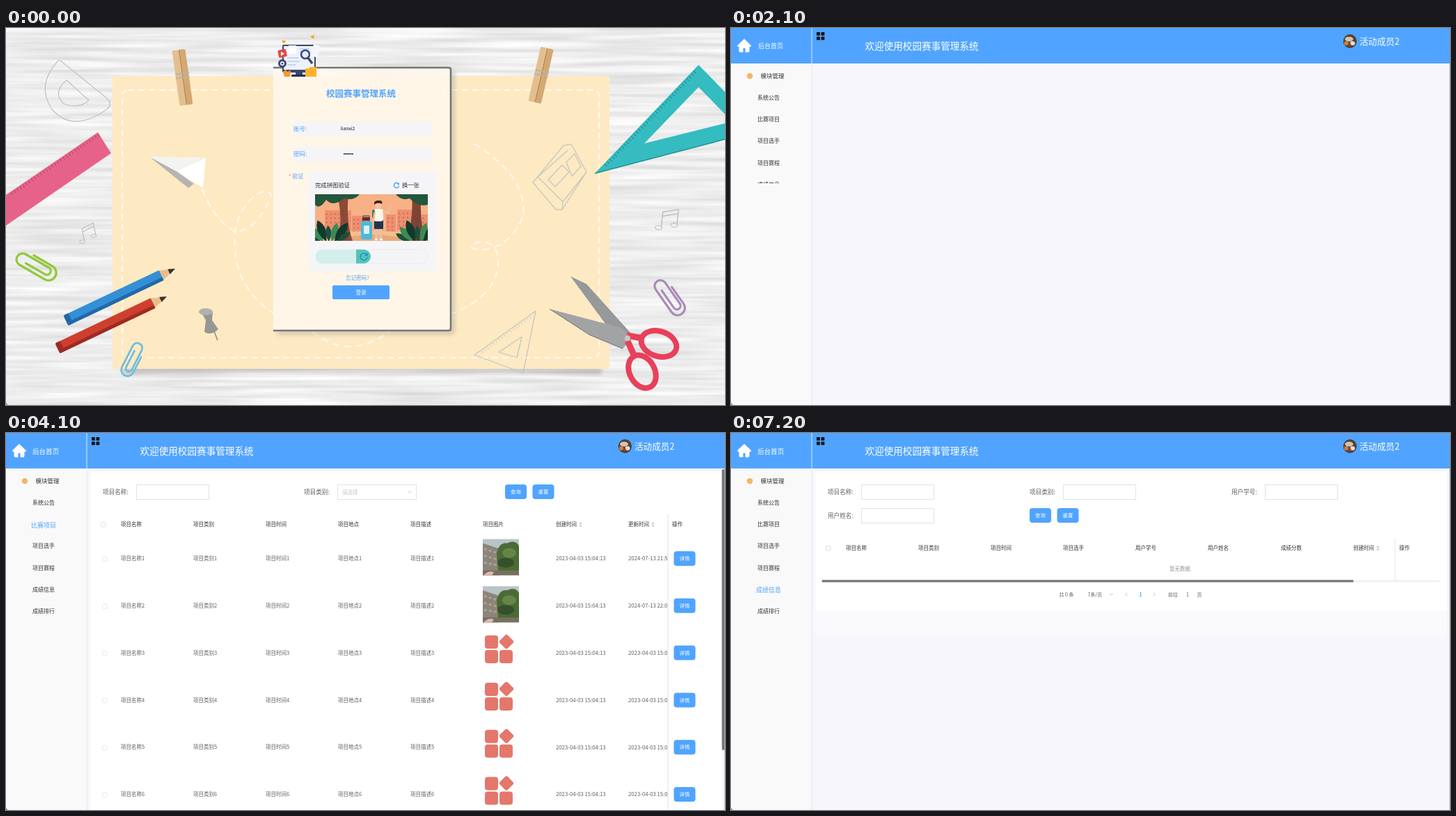
An HTML page that plays this animation: 1033 by 542 pixels, repeating every 8 s.

```html
<!DOCTYPE html>
<html lang="zh-CN">
<head>
<meta charset="utf-8">
<style>
  html, body { margin: 0; width: 100%; height: 100%; overflow: hidden; background: #f6f6fb; }
  svg { display: block; font-family: "Noto Sans CJK SC", "Noto Sans CJK", sans-serif; white-space: pre; }
</style>
</head>
<body>
<svg id="stage" width="1033" height="542" viewBox="0 0 1033 542"></svg>
<script>
const BLUE = '#50a4ff', DARK = '#303133', BODY = '#5c5e63';
const LOOP = 8000;

const rect = (x, y, w, h, fill, r = 0, more = '') =>
  `<rect x="${x}" y="${y}" width="${w}" height="${h}" fill="${fill}" rx="${r}" ${more}/>`;
const box = (x, y, w, h, stroke = '#dfe2e8', r = 0) =>
  rect(x + .5, y + .5, w - 1, h - 1, '#fff', r, `stroke="${stroke}"`);
const fill = (d, color, more = '') => `<path d="${d}" fill="${color}" ${more}/>`;
const line = (d, color, w = 1, more = '') =>
  `<path d="${d}" fill="none" stroke="${color}" stroke-width="${w}" ${more}/>`;
const oval = (x, y, rx, ry, color, more = '') =>
  `<ellipse cx="${x}" cy="${y}" rx="${rx}" ry="${ry}" fill="${color}" ${more}/>`;
const text = (x, y, s, size = 7.53, color = BODY, more = '') =>
  `<text x="${x}" y="${(y + size * .37).toFixed(2)}" font-size="${size}" fill="${color}" ${more}>${s}</text>`;
const group = (transform, s) => `<g transform="${transform}">${s}</g>`;
const MID = 'text-anchor="middle" ';
const BOLD = 'font-weight="500"';

// ---------- login screen ----------
const clip = (x, y, angle, scale, color) => group(`translate(${x} ${y}) rotate(${angle}) scale(${scale})`,
  line('M-4-14V15a5 5 0 0 0 10 0V-20a8 8 0 0 0-16 0V18a10 10 0 0 0 20 0V-10', color, 3, 'stroke-linecap="round"'));

const pencil = (x, y, light, dark) => group(`translate(${x} ${y}) rotate(154.6)`,
  fill('M0 0L24-8V8Z', '#e9bd8c') + fill('M0 0L10-4V4Z', '#3a3030') +
  rect(22, -8, 151, 16, light, 1) + rect(22, -8, 151, 5, dark) + rect(166, -8, 8, 16, dark, 2));

const peg = (x, y, angle) => group(`translate(${x} ${y}) rotate(${angle})`,
  rect(-10, -40, 10, 80, '#e3bf90', 2) + rect(0, -40, 9, 80, '#d3a873', 2) +
  line('M0-40V40', '#a97f50') + line('M-10-6H10M-10 0H10', '#b9b3a8', 2));

const refresh = (x, y, r, color) =>
  line(`M${x + r * .9} ${y - r * .4}A${r} ${r} 0 1 0 ${x + r} ${y + r * .2}`, color, 1.1) +
  fill(`M${x + r * 1.1} ${y - r}v${r * .8}h${-r * .8}Z`, color);

const leaf = (x, y, len, angle, color) => group(`translate(${x} ${y}) rotate(${angle})`,
  fill(`M0 0Q${len * .35} ${-len * .6} 0 ${-len}Q${-len * .35} ${-len * .6} 0 0`, color));

function captcha() {
  let s = '<clipPath id="picture"><path d="M444 239h162v67h-162Z"/></clipPath>' + rect(444, 239, 162, 67, '#f7b184');
  for (const [x, y, w] of [[458, 262, 38], [497, 270, 24], [546, 268, 14], [562, 261, 30], [590, 268, 16]]) {
    s += rect(x, y, w, 30, '#ee9070');
    for (let i = 3; i < w - 3; i += 6) s += line(`M${x + i} ${y + 4}v20`, '#d9785f', 2.5, 'stroke-dasharray="3 3"');
  }
  s += oval(525, 303, 85, 11, '#f3c08e') + fill('M470 306Q525 288 585 306Z', '#e8a878');
  s += fill('M474 306Q486 285 476 239H492Q488 280 498 306Z', '#8b4a35') +
       fill('M575 306Q586 275 583 239H597Q593 280 604 306Z', '#7d4434');
  s += fill('M444 239H508Q500 249 486 245Q470 258 460 247Q450 262 444 254Z', '#23563c') +
       fill('M606 239H560Q568 249 580 245Q592 258 606 254Z', '#23563c');
  for (let i = 0; i < 7; i++) {
    const color = ['#1d4f3a', '#3f8a54', '#12392d'][i % 3];
    s += leaf(452 + i * 4, 307, 23 + i % 3 * 5, -60 + i * 19, color) +
         leaf(580 + i * 4, 307, 23 + i % 3 * 5, -60 + i * 19, color);
  }
  // traveller and suitcase
  s += line('M513 280V270H522V280', '#345', 1) + rect(510, 278, 16, 26, '#4db8dc', 3) +
       rect(514, 284, 8, 12, '#d9f1f5', 1) + rect(512, 272, 11, 5, '#5a3030', 2);
  s += line('M532 278V304M538 278V304', '#efbf9d', 4) + line('M530 304h4M537 304h4', '#fff', 2.5) +
       rect(529, 276, 13, 13, '#25344d', 1) + rect(528, 260, 14, 18, '#fff7e8', 4) +
       rect(526, 261, 4, 13, '#3c8a62', 2) + line('M541 264L549 266L553 254', '#efbf9d', 2.5) +
       line('M530 265L527 278', '#efbf9d', 2.5) + oval(535, 254, 5, 5.5, '#f3c6a2') +
       fill('M529 254Q528 247 536 248Q542 248 540 253Q534 250 529 254', '#3a2626');
  return `<g clip-path="url(#picture)">${s}</g>`;
}

function emblem() {
  return rect(397, 24, 48, 40, '#3d4870', 2) + rect(399, 26, 44, 34, '#edf1fb') +
    rect(406, 25, 11, 12, '#fff') + line('M422 30h14M422 34h9M404 43h16M404 48h18M404 53h12', '#c9d5ee', 2) +
    rect(391, 31, 12, 11, '#e04a43', 2, 'transform="rotate(-12 397 36)"') + fill('M395 34l5 3-5 3Z', '#fff') +
    oval(397, 51, 4.5, 4.5, '#fff', 'stroke="#3d4870" stroke-width="3"') + oval(397, 51, 1.5, 1.5, '#3d4870') +
    oval(430, 38, 6, 6, '#dcebff', 'stroke="#3d4870" stroke-width="2.5"') + line('M434 43l6 8', '#3d4870', 3.5) +
    rect(439, 24, 11, 17, '#f4f6fb', 1, 'transform="rotate(20 444 33)"') +
    rect(416, 62, 10, 7, '#3d4870') + rect(410, 67, 22, 3, '#27304f', 1) +
    fill('M430 58h5l2-2h9v14h-16Z', '#fdb32b') + fill('M398 63l4-3 2 3 5-2-1 9h-8Z', '#f59b2a') +
    fill('M437 12l6-2-1 6ZM396 18h6l-3 5Z', '#f7a823');
}

function login() {
  const sketch = d => line(d, '#c6c6bd', 1.3, 'stroke-linejoin="round"');
  const dash = d => line(d, '#fffaf0', 2, 'stroke-dasharray="10 7"');
  let s = `<filter id="wood" x="0" y="0" width="1" height="1" color-interpolation-filters="sRGB">
    <feTurbulence type="fractalNoise" baseFrequency=".006 .14" numOctaves="2" seed="4"/>
    <feColorMatrix values=".2 0 0 0 .83 .2 0 0 0 .83 .2 0 0 0 .83 0 0 0 0 1"/></filter>
    <filter id="soft"><feGaussianBlur stdDeviation="3"/></filter>`;
  s += rect(0, 0, 1033, 542, '#eee', 0, 'filter="url(#wood)"');
  s += fill('M162 480H860L854 499Q510 487 170 499Z', '#8886', 'filter="url(#soft)"') + rect(153, 69, 714, 421, '#fdeac3');
  s += rect(167, 89, 685, 385, 'none', 8, 'stroke="#fffaf0" stroke-width="2" stroke-dasharray="9 6"');

  s += dash('M282 232Q300 278 330 293Q362 290 381 240Q374 226 351 247Q325 275 329 318Q332 375 384 410') +
       dash('M440 436Q490 480 552 436') +
       dash('M672 166Q750 214 743 270Q725 316 682 319Q656 316 678 308Q708 304 707 340Q704 385 640 411');
  s += peg(254, 71, -8) + peg(769, 68, 13);
  s += sketch('M74 48Q43 82 66 117Q97 152 146 116Q153 109 145 101L82 50Q77 45 74 48ZM87 75Q66 93 83 109Q106 117 119 104ZM87 75L119 104');
  s += fill('M0 240L132 150L151 180L0 284Z', '#e76289') +
       line('M8 238L134 153', '#b84868', 5, 'stroke-dasharray="1 4"');
  s += fill('M995 53L846 209L1033 160V137L917 166L995 85L1033 124V92Z', '#35bcc0') +
       line('M990 63L860 199', '#20898f', 5, 'stroke-dasharray="1 4"') + line('M846 209L1033 160', '#218f94', 1.5);
  s += fill('M206 185L287 187L283 230L245 206Z', '#fff') + fill('M206 185L245 206L270 224L262 230Z', '#b4b4b2') +
       fill('M206 185L287 187L245 206Z', '#f3f3f1');
  s += sketch('M757 222L801 169L812 167L834 207L799 261L790 261ZM757 222L764 214L800 250L799 261M764 214L807 176M800 250L834 207M779 218L799 197L809 207L789 228ZM805 193L817 181L826 199L813 213Z');
  s += sketch('M673 470L761 407L743 496ZM708 466L741 444L734 474Z') +
       line('M684 466L754 416', '#c6c6bd', 3, 'stroke-dasharray="1 4"');
  const note = line('M6 24V2L28-4V18M6 8L28 2', '#b9b9b9', 1.3) +
    oval(2, 25, 5, 3, 'none', 'stroke="#b9b9b9"') + oval(24, 19, 5, 3, 'none', 'stroke="#b9b9b9"');
  s += group('translate(938 262) rotate(6)', note) + group('translate(104 288) rotate(-12) scale(.8)', note);

  s += clip(44, 342, -60, 1.1, '#93c83d') + clip(954, 387, -35, 1.05, '#a98bb8') + clip(182, 477, 27, .9, '#70bcdc');
  s += pencil(243, 346, '#3390d6', '#2467a8') + pencil(231, 386, '#cf3f2d', '#9c2b25');
  s += line('M299 436L304 449', '#888', 1.5) + fill('M280 408Q287 402 297 408L296 420L305 433Q295 443 285 437L287 420Z', '#969794') +
       oval(287, 408, 10, 5, '#b0b1ae');
  s += fill('M811 357L834 368L897 438L886 453L872 440Z', '#96989a') + fill('M781 404L884 431L900 446L886 461L838 441Z', '#a2a3a4') +
       line('M781 404L838 441L886 461', '#707275', 1) + line('M892 442L914 446M893 450L903 472', '#e8405b', 9) +
       oval(938, 454, 26, 18, 'none', 'stroke="#e8405b" stroke-width="8" transform="rotate(18 938 454)"') +
       oval(914, 494, 18, 25, 'none', 'stroke="#e8405b" stroke-width="8" transform="rotate(-28 914 494)"') +
       oval(893, 446, 4, 4, '#c9c9c9');

  // card
  s += line('M390 438H639Q642 438 642 434V62', '#8888', 4, 'filter="url(#soft)"');
  s += fill('M384 57H636Q639 57 639 60V432Q639 435 636 435H384Z', '#fff8ef', 'opacity=".85"') +
       line('M384 57H636Q639 57 639 60V432Q639 435 636 435H384', '#747774', 2.6);
  s += emblem() + text(510, 94, '校园赛事管理系统', 12.5, BLUE, MID + 'font-weight="700"');
  s += rect(412, 134, 201, 21, '#f5f5f7', 2) + text(413, 145, '账号:', 8.5, BLUE) + text(491, 145, 'lianxi2', 6.7, '#111', MID);
  s += rect(412, 171, 201, 21, '#f5f5f7', 2) + text(413, 181, '密码:', 8.5, BLUE);
  for (let i = 0; i < 6; i++) s += oval(486 + i * 2.4, 181, .95, .95, '#111');
  s += text(406, 213, '*', 7.5, '#f56c6c') + text(411, 213, '验证', 8.2, BLUE);
  s += rect(434, 206, 184, 143, '#f5f5f7') + text(444, 226, '完成拼图验证', 8.4, DARK) +
       refresh(561, 226, 3.6, '#2d8cf0') + text(569, 226, '换一张', 8.3, DARK) + captcha();
  s += rect(444.5, 318.5, 161, 20, '#f5f5f7', 10, 'stroke="#ececf0"') +
       fill('M504 318.5H454.5a10 10 0 0 0 0 20H504Z', '#d4efeb') +
       fill('M503 318.5H514a10 10 0 0 1 0 20H503Z', '#51c5b7') + refresh(514, 328.5, 5, '#2277e0');
  s += text(505, 359, '忘记密码?', 7.5, BLUE, MID) + rect(469, 370, 82, 20, BLUE, 2) +
       text(510, 380, '登录', 7.6, '#fff', MID + BOLD);
  return s;
}

// ---------- admin screens ----------
const MENU = ['系统公告', '比赛项目', '项目选手', '项目赛程', '成绩信息', '成绩排行'];
const EVEN = [165, 269, 373, 477, 581, 685, 790, 894];
const WIDE = [165, 280, 393, 505, 618, 730, 843];
const SEARCH4 = ['项目名称', '项目类别', '用户学号', '用户姓名'];
const PAGES = [
  { at: 2700, loaded: 2800, fields: ['公告标题', '公告标签'], buttons: 719, xs: WIDE, actionX: 955,
    cols: ['公告标题', '公告标签', '公告日期', '公告描述', '公告内容', '创建时间', '更新时间'] },
  { at: 3600, loaded: 3700, fields: ['项目名称', '项目类别'], buttons: 717, xs: EVEN, actionX: 957, tall: true,
    cols: ['项目名称', '项目类别', '项目时间', '项目地点', '项目描述', '项目图片', '创建时间', '更新时间'] },
  { at: 5000, fields: SEARCH4, xs: EVEN, actionX: 960, emptyX: 801, bar: 586,
    cols: ['项目名称', '项目类别', '项目时间', '项目地点', '项目选手', '用户学号', '用户姓名', '项目组别'] },
  { at: 5900, loaded: 6000, fields: ['项目名称', '项目类别'], buttons: 719, xs: WIDE, actionX: 955,
    cols: ['项目名称', '项目类别', '项目地点', '比赛时间', '注意事项', '创建时间', '更新时间'] },
  { at: 7000, fields: SEARCH4, xs: EVEN, actionX: 960, emptyX: 645, bar: 764, below: '#fafafc',
    cols: ['项目名称', '项目类别', '项目时间', '项目选手', '用户学号', '用户姓名', '成绩分数', '创建时间'] },
];

const button = (x, y, label) => rect(x, y, 31, 21, BLUE, 4) + text(x + 15.5, y + 10.5, label, 7.4, '#fff', MID + BOLD);
const chevron = (x, y, turn) => group(`translate(${x} ${y}) rotate(${turn})`, line('M-2.5-1.2L0 1.2L2.5-1.2', '#b4b8c0', .8));
const mix = (a, b, p) => `rgb(${a.map((v, i) => Math.round(v + (b[i] - v) * p))})`;
const menuColor = p => mix([48, 49, 51], [80, 164, 255], p);
const stepped = (t, start, levels) => levels[Math.min(2, Math.floor((t - start) / 100))];

function frame(t, active) {
  let s = rect(0, 0, 1033, 542, '#f6f6fb') + rect(0, 51, 116, 491, '#f9f9f9') + rect(115.5, 51, 1, 491, '#e6e7ec') +
    rect(0, 0, 1033, 51, BLUE) + rect(115.5, 0, 1, 51, '#d8eaff');
  s += fill('M19 16L9.5 25.2Q9 26.5 10.5 26.5H12V33Q12 34.5 13.5 34.5H17V28.5H21V34.5H24.5Q26 34.5 26 33V26.5H27.5Q29 26.5 28.5 25.2Z',
    '#fff', 'stroke="#fff" stroke-linejoin="round"');
  s += t < 2700 ? text(39, 26, '后台首页', 9, '#fff') : text(38, 26, '后台首页', 9.55, '#fff');
  for (const x of [123, 129.5]) for (const y of [6, 12.5]) s += rect(x, y, 4.8, 4.8, '#111');
  s += text(192.5, 26, '欢迎使用校园赛事管理系统', 13.6, '#fff') + text(903, 19, '活动成员2', 12.6, '#fff');
  s += oval(889.3, 19, 9.7, 9.9, t < 1100 ? '#c0c4cc' : '#50423a');
  if (t >= 1100) s += oval(888, 16, 6, 3.5, '#d8c3a5') + oval(884, 22, 3, 3, '#c98443') +
    oval(893, 22, 3.5, 3, '#e8ded0') + oval(889, 24, 2, 2, '#a23f2c');
  s += oval(27, 69, 3.6, 3.6, '#f0ad55', 'stroke="#f0b568" stroke-width="1.8" stroke-dasharray="1.6 1.2"') +
       line('M25.3 69l1.3 1.3 2.3-2.5', '#fbe3bd', .9) + text(42.5, 69, '模块管理', 8.5, DARK);
  if (t >= 2000) {
    const p = active < 0 ? 0 : stepped(t, PAGES[active].at, [.25, .7, 1]);
    MENU.forEach((label, i) => {
      const on = i === active, wasOn = i === PAGES.length - 1 ? false : i === active - 1;
      const color = menuColor(on ? p : wasOn ? 1 - p : 0);
      s += text(54, 100 + i * 31.2 + on, label, on ? 9 : 8, color, MID);
    });
    const shown = 84 + 186 * stepped(t, 2000, [.3, .75, 1]);
    s += rect(20, shown, 90, 280 - shown, '#f9f9f9');
  }
  return s;
}

function pager(y, total, d) {
  let s = text(462 + d, y, `共 ${total} 条`, 7) + text(503 + d, y, '7条/页', 7) + chevron(537 + d, y, 0) +
    chevron(558.5 + d, y, 90) + text(579 + d, y, '1', 7, BLUE, MID + 'font-weight="700"');
  if (total > 7) s += text(597.5, y, '2', 7, DARK, MID + 'font-weight="700"');
  return s + chevron(617.5 - d, y, -90) + text(637.5 - d, y, '前往', 7) + text(665.5 - d, y, '1', 7, BODY, MID) + text(679 - d, y, '页', 7);
}

function searchBar(page) {
  let s = '';
  page.fields.forEach((label, i) => {
    const select = Boolean(page.tall && i === 1);
    const x = 139 + i % 3 * 290 - select, y = i > 2 ? 108 : 74;
    s += text(x, y + 10.5, label + ':', 8.6, BODY) + box(x + 48, y, select ? 114 : 105, 22);
    if (select) s += text(x + 55, y + 11, '请选择', 7.5, '#c0c4cc') + chevron(580, y + 11, 0);
  });
  const [x, y] = page.buttons ? [page.buttons, 74] : [429, 108];
  return s + button(x, y, '查询') + button(x + 39.5, y, '重置');
}

function photo(x, y) {
  return rect(x, y, 52, 52, '#b9c4c7') + fill(`M${x} ${y + 6}l24 8v38h-24Z`, '#8b8478') +
    line(`M${x + 2} ${y + 14}l22 7M${x + 2} ${y + 24}l22 6M${x + 2} ${y + 34}l22 4`, '#aaa192', 3, 'stroke-dasharray="4 3"') +
    fill(`M${x + 20} ${y + 20}q4-16 15-14q12-6 17 4v36h-30Z`, '#4c6a35') +
    oval(x + 38, y + 20, 10, 7, '#668548') + oval(x + 33, y + 34, 12, 7, '#35512b') +
    rect(x, y + 45, 52, 7, '#77705f') + fill(`M${x + 1} ${y + 52}q8-8 15-4l-3 4Z`, '#e5b6ae');
}

const tiles = (x, y) => rect(x + 3, y + 4, 19, 19, '#e4776b', 4) + rect(x + 3, y + 25, 19, 19, '#e4776b', 4) +
  rect(x + 24, y + 25, 19, 19, '#e4776b', 4) + rect(x + 26, y + 5, 16, 16, '#e4776b', 3, `transform="rotate(45 ${x + 34} ${y + 13})"`);

function cell(page, title, x, y, row, t) {
  if (title === '项目图片') {
    if (row < 3) return photo(x, y - 28);
    return t >= 4100 ? tiles(x, y - 29) : '';
  }
  if (/创建时间|更新时间/.test(title)) {
    const edited = page.tall && title === '更新时间' && row < 3;
    return text(x, y, edited ? ['2024-07-13 21:53:27', '2024-07-13 22:02:15'][row - 1] : '2023-04-03 15:04:13', 7.75);
  }
  if (/公告描述|公告内容|注意事项/.test(title))
    return text(x, y - 6, '此处可上传文字、图片、视频、') + text(x, y + 6, '超链接、表格等内容区' + row);
  return title === '公告日期' ? text(x, y, '2023-04-03', 7.75) : text(x, y, title + row);
}

function table(page, t) {
  const headY = page.fields.length > 3 ? 165.5 : 131.5;
  const full = t >= page.loaded;
  let s = box(136, headY - 3.5, 7.5, 7.5, full ? '#dcdfe6' : '#d5dbe4', 1);
  page.cols.forEach((title, i) => {
    const x = page.xs[i];
    s += text(x, headY, title, 7.53, DARK, BOLD);
    if (/创建时间|更新时间/.test(title)) s += fill(`M${x + 33} ${headY - .7}l2.5-2.6 2.5 2.6ZM${x + 33} ${headY + 1}l2.5 2.6 2.5-2.6Z`, '#bfc3cb');
  });
  const action = text(page.actionX, headY, '操作', 7.53, DARK, BOLD);
  if (!full) {
    s += text(page.emptyX || 575, headY + 30, '暂无数据', 7.5, '#909399', MID);
    if (page.bar) s += rect(131, 211.5, 888, 3, '#f2f2f4', 1.5) + rect(130.5, 211.3, page.bar, 3.2, '#777478', 1.5) + rect(953.5, 152, 1, 62, '#e6e6ea');
    return s + action + pager(headY + (page.bar ? 66.5 : 62), 0, 9.5);
  }
  const [firstY, pitch, rows] = page.tall ? [180.5, 67.8, 6] : [166, 38.5, 7];
  let fixed = page.tall ? rect(951, 117, 72, 425, '#fff') + rect(950.5, 117, 1.5, 425, '#ececef') : '';
  for (let row = 1; row <= rows; row++) {
    const y = firstY + (row - 1) * pitch;
    s += box(138, y - 3, 7.5, 7.5, '#e6e8ed', 1);
    page.cols.forEach((title, i) => s += cell(page, title, page.xs[i], y, row, t));
    fixed += button(page.tall ? 959.5 : 958, y - 10.5, '详情');
  }
  s += fixed + action;
  return s + (page.tall ? rect(1028.5, 52, 4, 404, '#777478', 2) : rect(135, 415.5, 884, 1, '#eff0f3') + pager(433, 8, 0));
}

function admin(t) {
  const active = PAGES.findLastIndex(page => t >= page.at);
  let s = frame(t, active);
  if (active >= 0) {
    const page = PAGES[active], full = t >= page.loaded;
    const bottom = full ? (page.tall ? 542 : 493) : page.fields.length > 3 ? 293 : 255;
    s += rect(121, 55, 908, bottom - 55, '#fff');
    if (full && !page.tall) s += rect(121, 255, 908, 238, '#fafafa');
    if (page.below) s += rect(121, 255, 908, 38, page.below);
    s += searchBar(page) + table(page, t);
  }
  return s + rect(1032, 0, 1, 542, '#8a9aa5', 0, 'opacity=".55"');
}

const stage = document.getElementById('stage');
const loginScene = login();
const corner = fill('M0 538Q1 541 4 542H0Z', '#9aa0a4');
let shown = '';

function draw(now) {
  const t = now % LOOP;
  const scene = (t < 800 ? loginScene : admin(t)) + corner;
  if (scene !== shown) stage.innerHTML = shown = scene;
  requestAnimationFrame(draw);
}
requestAnimationFrame(draw);
</script>
</body>
</html>
```
